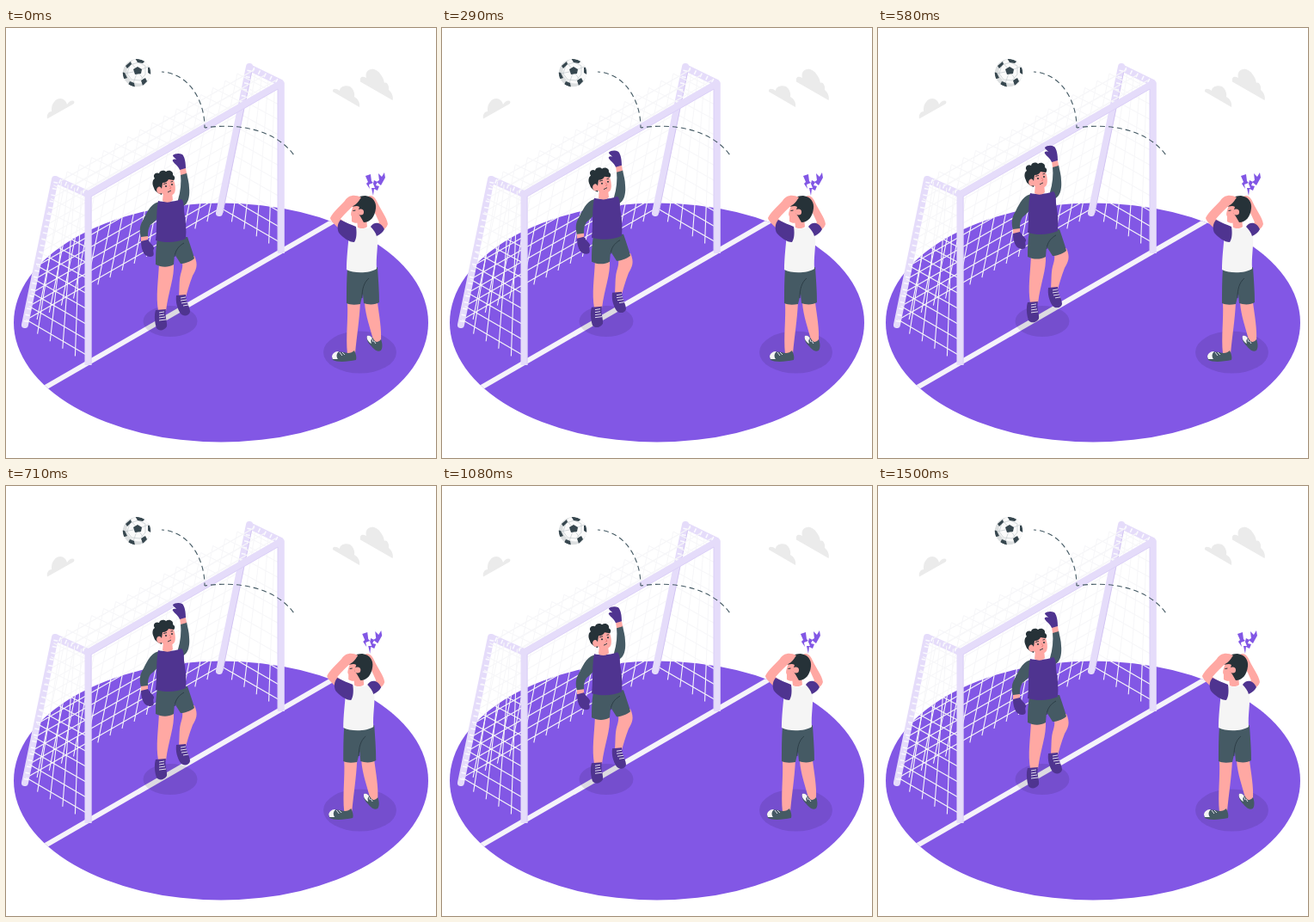
Animation of 500x500 px, one loop 1.54 s. Source, as an HTML page:

```html
<!DOCTYPE html>
<html lang="en">
<head>
<meta charset="utf-8">
<title>Missed goal</title>
<style>
  html, body { margin: 0; width: 100%; height: 100%; overflow: hidden; background: #fff; }
  svg { display: block; width: 100vw; height: 100vh; }
  .pitch { fill: #8257e5; }
  .bar { stroke: #e5dcfa; stroke-width: 8; fill: none; }
  .net { stroke: #f7f7f9; stroke-width: 1.1; fill: none; }
  .skin { fill: #ffa8a3; }
  .kit { fill: #4f3490; }
  .dark { fill: #455a64; }
  .ink { fill: #263238; }
  .white { fill: #f5f5f5; }
  .fold { fill: none; stroke: #2b3c44; stroke-width: .9; }
  .lace { fill: none; stroke: #f2effa; stroke-width: .9; }
  .shade { fill: #000; opacity: .1; }
</style>
</head>
<body>
<svg viewBox="0 0 500 500">
  <defs>
    <clipPath id="field"><ellipse cx="250" cy="342.5" rx="241" ry="139"/></clipPath>
    <clipPath id="round"><circle cx="152" cy="52.3" r="16.2"/></clipPath>
  </defs>

  <g fill="#ebebeb">
    <path d="M48 105.500C47 100 50 97 53 97C52 88 58 82 63 82C67 82 70 85 71 89C73 85 78 83 79.500 86L79 88Z"/>
    <path d="M380 74C379 70 384 70 388 73C388 68 395 66 400 68C404 71 406 76 405 80C409 82 412 87 411 92Z"/>
    <path d="M412 62.500C411 56 415 56 419 58C417 51 422 47 428 48C434 50 439 57 440 64C443 62 446 68 445 72C448 74 451 80 449.500 84Z"/>
  </g>

  <ellipse class="pitch" cx="250" cy="342.500" rx="241" ry="139"/>
  <path d="M30 427L400 213.500" stroke="#f5f3fa" stroke-width="6" clip-path="url(#field)"/>
  <ellipse class="shade" cx="191" cy="341" rx="31.500" ry="18"/>
  <ellipse class="shade" cx="411.500" cy="377" rx="42.500" ry="24.500"/>

  <path id="farNet" class="net"/>
  <path class="bar" d="M283 45L248 215" stroke-linecap="round"/>
  <path d="M286.500 47L252 215" stroke="#d3c5f3"/>
  <path class="bar" d="M57 176L22 345" stroke-linecap="round"/>
  <path class="bar" d="M95 193L57 176M320 64L283 46"/>
  <path d="M58 179L23 343M62 178L95 192M283 49L273 93M287 48L320 64"
        stroke="#fbfaff" stroke-width="5" stroke-dasharray="1.500 6"/>
  <path id="nearNet" class="net"/>
  <path class="bar" d="M95.500 392V193.500L319.800 64.500V262" stroke-width="8.500" stroke-linejoin="round"/>
  <path d="M99 392V196L316 71V260" fill="none" stroke="#d8ccf6" stroke-width=".8"/>

  <path d="M181 51C209 52 231 80 231 116M231 116C272 110 314 119 335 148" fill="none"
        stroke="#455a64" stroke-width="1.100" stroke-dasharray="6 4" stroke-dashoffset="3"/>

  <g clip-path="url(#round)">
    <circle cx="152" cy="52.300" r="16.200" fill="#dcdfe0"/>
    <circle cx="155" cy="50" r="14.500" fill="#fafafa"/>
    <path d="M153 50L146 41M153 50L168 44M153 50L162 63M153 50L147 67M153 50L138 53M144 43L141 53L146 60L156 61L162 54L162 44L154 40Z"
          fill="none" stroke="#c3cacd" stroke-width=".7"/>
    <path fill="#37474f" d="M148 48L153 45L158 48L157 53L150 54ZM139 44L145 39L146 42L141 47ZM150 35L162 38L159 41L153 40ZM165 46L170 45V55L165 52ZM157 61L162 58L164 62L159 67ZM144 62L149 64L150 69L142 66ZM134 51L138 52L141 58L135 60Z"/>
  </g>

  <g id="keeper">
    <path class="skin" d="M178 273L195 273C196 291 189 305 186 329H177C174 311 177 296 178 273ZM205 269L219 265C224 276 221 281 217 288C213 298 211 306 209 313L201 312C202 299 201 292 204 283C206 277 205 273 205 269Z"/>
    <path class="kit" d="M174 328L186 327C184 335 188 342 187 347C184 352 178 353 175 349C173 343 172 334 174 328ZM198 311L209 310C209 318 214 324 214 330C213 335 206 336 203 332C199 326 197 318 198 311Z"/>
    <path class="lace" d="M178 331L184 330M178 334L184 333M178 337L185 336M178 340L186 339M203 314L209 313M203 317L210 316M204 320L211 319M206 323L212 322"/>
    <path class="dark" d="M176 245L211 243C214 252 217 260 219 268C214 272 207 274 203 274L196 263L195 275C188 279 180 278 174 275C174 265 174 256 176 245Z"/>
    <path class="fold" d="M196 266C197 259 200 254 207 250"/>
    <path class="dark" d="M180 202C170 202 165 212 160 222C155 230 155 236 157 244L165 243C165 237 165 234 168 229C173 225 177 221 179 217ZM203 208C212 207 214 196 213 186C213 180 211 174 210 168L203 170C204 180 203 190 200 200Z"/>
    <path class="kit" d="M177 201C185 203 197 202 204 199C207 202 207 207 207 213C209 223 210 235 209 245C198 250 185 250 174 247C176 232 174 216 177 201Z"/>
    <path class="skin" d="M157 243L165 242V247L157 249ZM202 164L209 163L210 169L203 171Z"/>
    <path class="kit" d="M157 248L165 246C168 251 173 254 172 257C170 258 173 263 171 265C168 267 164 266 161 263C158 259 157 253 157 248ZM202 165L209 163C209 157 208 150 205 147C201 145 196 146 194 148C194 150 197 151 198 153C195 152 193 153 194 155C196 158 200 160 202 165Z"/>
    <path class="skin" d="M183 190L193 191L194 200C190 204 185 203 182 201Z"/>
    <path class="ink" d="M172 186C169 180 171 176 173 175C170 171 174 167 178 169C179 165 184 165 186 167C190 164 195 167 194 171C198 173 196 178 193 178L184 181L181 194C177 192 173 190 172 186Z"/>
    <path class="skin" d="M182 180C186 180 188 178 189 176L195 177C197 182 198 190 195 193C190 197 184 195 181 192C176 195 173 187 177 185C179 184 180 185 181 187Z"/>
    <g class="ink"><circle cx="186" cy="184" r="1"/><circle cx="193" cy="182" r="1"/></g>
    <path d="M183 181.500L187 180.500M191.500 179L194 178.500M188 191L192 189" stroke="#263238" stroke-width=".9"/>
    <path d="M190 183L192 186L190 187" fill="none" stroke="#e57878" stroke-width=".8"/>
  </g>

  <g id="striker">
    <path class="pitch" d="M418 172L424 170L425 178L427 180L422 182L423 187L419 181L421 179ZM428 177L432 179L430 183L434 184L432 189L428 187L427 195L425 186L429 186L427 181ZM433 169L437 173L440 168L441 174L436 183L431 179L434 177Z"/>
    <path class="skin" d="M397 319H412C411 340 408 357 406 379H397C395 358 398 340 397 319ZM417 319H432C434 335 437 350 436 364L428 366C424 350 418 335 417 319Z"/>
    <path class="dark" d="M379 382C381 376 388 376 393 377C398 379 402 378 405 375C407 379 408 383 407 386C398 388 385 389 380 386ZM420 358C424 357 427 361 429 364C431 366 434 365 436 362C438 367 438 372 436 375C431 378 427 372 423 368C420 365 419 361 420 358Z"/>
    <path class="white" d="M379 382C380 377 384 376 387 376C384 379 384 382 386 385L380 385ZM420 358C423 357 425 359 426 361C424 362 424 364 425 367C421 365 419 361 420 358Z"/>
    <path class="lace" d="M388 377L391 381M391 377L394 380M426 362L427 365M428 364L430 367"/>
    <path class="dark" d="M397 279C408 283 424 283 432 278C433 293 434 306 434 319C430 322 421 322 416 320L415 309L412 321C406 322 400 322 396 320C396 307 396 294 397 279Z"/>
    <path class="fold" d="M414 314C414 304 416 296 422 291"/>
    <path class="skin" d="M421 196C426 193 430 198 432 203C436 212 443 220 444 228C443 232 440 234 437 236L429 231L434 226C431 219 427 210 423 205Z"/>
    <path class="white" d="M406 232C414 235 424 233 428 229C431 231 433 236 432 241C433 254 430 266 431 280C424 285 405 286 396 281C396 268 398 250 399 240Z"/>
    <path class="kit" d="M424 231C428 225 436 225 440 234C438 238 435 240 431 242C430 238 427 234 424 231Z"/>
    <path class="skin" d="M408 222L419 220L420 231C417 234 411 233 409 232Z"/>
    <path class="skin" d="M404 206C402 212 400 217 402 219L402 225C406 228 412 227 415 223L418 207Z"/>
    <path class="ink" d="M401 208C403 199 410 195 418 195C427 196 431 203 430 210C429 219 424 226 416 226L412 219L409 215L411 208C408 206 404 208 401 208Z"/>
    <circle class="skin" cx="412.500" cy="214" r="3.600"/>
    <path d="M403.500 212.500L406.500 212" stroke="#263238"/>
    <path class="skin" d="M413 197C406 193 398 194 394 201C388 208 380 214 377 221C378 225 383 229 387 233L394 226L389 222C394 216 400 210 405 206C408 205 411 200 413 197Z"/>
    <path class="kit" d="M389 223C385 228 385 233 387 238C392 244 399 249 405 249C408 245 408 237 407 231C402 229 395 226 389 223Z"/>
  </g>
</svg>

<script>
const $ = id => document.getElementById(id);
const mix = (a, b, u) => a + (b - a) * u;

// Open grid across the quad a-b-c-d: no border lines, loose ends along c-d
function mesh([a, b, c, d], cols, rows) {
  const at = (u, v) => [0, 1].map(i => mix(mix(a[i], b[i], u), mix(d[i], c[i], u), v).toFixed(1));
  let path = "";
  for (let i = 1; i < cols; i++) path += `M${at(i / cols, 0)}L${at(i / cols, 1)}`;
  for (let i = .5; i < rows; i++) path += `M${at(0, i / rows)}L${at(1, i / rows)}`;
  return path;
}
const left = [[95, 193], [57, 175], [22, 347], [95, 390]];
const right = [[320, 64], [283, 45], [248, 217], [320, 259]];
$("farNet").setAttribute("d",
  mesh([left[1], right[1], right[2], left[2]], 16, 11) + mesh(right, 5, 11));
$("nearNet").setAttribute("d",
  mesh([left[0], right[0], right[1], left[1]], 16, 3) + mesh(left, 5, 11));

function bezier(x1, y1, x2, y2) {
  const curve = (p, q, s) => 3 * p * s * (1 - s) ** 2 + 3 * q * s * s * (1 - s) + s ** 3;
  return x => {
    let lo = 0, hi = 1;
    for (let i = 0; i < 24; i++) {
      const mid = (lo + hi) / 2;
      if (curve(x1, x2, mid) < x) lo = mid; else hi = mid;
    }
    return curve(y1, y2, lo);
  };
}
const ease = bezier(.25, .1, .25, 1);
const easeInOut = bezier(.42, 0, .58, 1);

const FPS = 24, STEPS = 37, CYCLE = 1500, LEAD = 10;
const shake = [0, -1, 2, -4, 4, -4, 4, -4, 2, -1, 0];

function draw(now) {
  const step = Math.floor((now % 1540) * FPS / 1000 + .06) % STEPS;
  const phase = (step * 1000 / FPS + LEAD) % CYCLE / CYCLE;

  const half = phase * 2;
  const lift = half < 1 ? easeInOut(half) : 1 - easeInOut(half - 1);
  $("keeper").setAttribute("transform", `translate(0 ${-10 * lift})`);

  const i = Math.floor(phase * 10);
  const x = mix(shake[i], shake[i + 1], ease(phase * 10 - i));
  $("striker").setAttribute("transform", `translate(${x} 0)`);
}

const start = performance.now();
function tick() {
  draw(performance.now() - start);
  requestAnimationFrame(tick);
}
tick();
</script>
</body>
</html>
```
